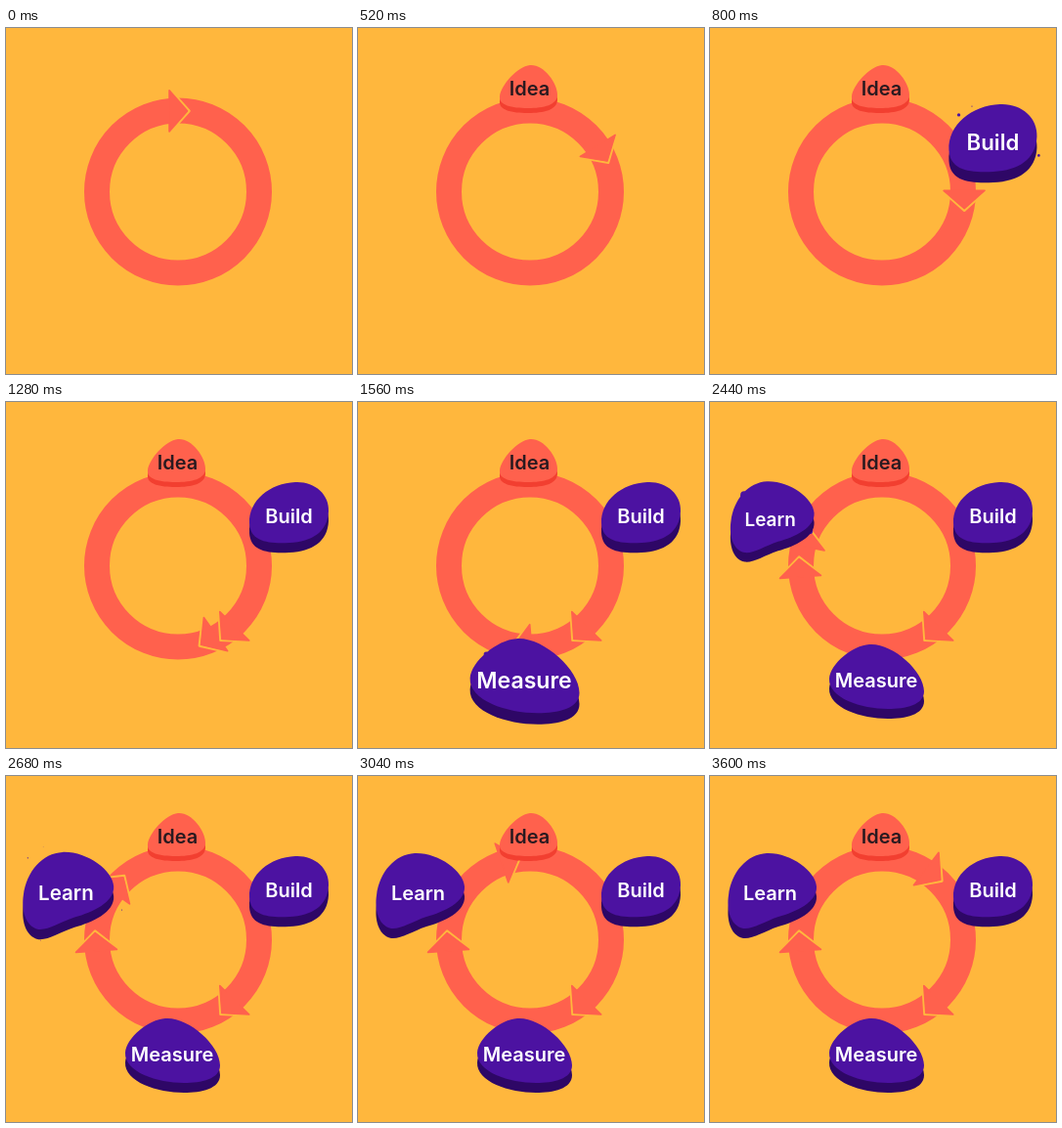
Write an HTML page with a canvas that moves like this. It is 354 by 354 pixels and loops after 4.04 s.

```html
<!DOCTYPE html>
<html lang="en">
<head>
<meta charset="utf-8">
<title>Idea, build, measure, learn</title>
<style>
  html, body { margin: 0; overflow: hidden; background: #ffb73d; }
  canvas { display: block; width: 100vw; height: 100vh; }
</style>
</head>
<body>
<canvas></canvas>
<script>
const SIZE = 354, LOOP = 4040, STEP = 40, LEG = 1200, POP = 400;
const BG = '#ffb73d', RED = '#ff614d';
const CX = 176, CY = 167.5;

const canvas = document.querySelector('canvas');
const ctx = canvas.getContext('2d');
canvas.width = canvas.height = SIZE * devicePixelRatio;
ctx.scale(devicePixelRatio, devicePixelRatio);

const lerp = (a, b, p) => a + (b - a) * p;
const clamp = p => Math.max(0, Math.min(1, p));
const rad = deg => deg * Math.PI / 180;
const backOut = p => 1 + 3.2 * (p - 1) ** 3 + 2.2 * (p - 1) ** 2;

// Each leg: [from, to] for tip angle (clockwise from top), heading and tip radius
const legs = [
  { tip: [8.3, 150.7], heading: [0, 134.5], radius: [83.5, 88] },
  { tip: [157.5, 276.4], heading: [136, 266], radius: [85, 85.5] },
  { tip: [294.3, 406], heading: [277, 397.5], radius: [85.5, 86] },
];

const purple = { face: '#4c12a1', side: '#2e0766', ink: '#fff' };
const stones = [
  { label: 'Idea', start: 0, x: 174, y: 62, rx: 30, ry: 24, depth: 5, textX: 175.5, baseline: 69,
    face: RED, side: '#f23f30', ink: '#2a1a20',
    shape: 'M176 38C190 37 204 56 204 68C204 79 190 82 174 82C157 82 144 79 145 70C146 59 163 39 176 38Z' },
  { label: 'Build', start: 520, x: 290, y: 118, rx: 41, ry: 36, depth: 10, textX: 289.5, baseline: 124, ...purple,
    shape: 'M296 82C315 81 331 94 330 112C329 133 313 143 290 144C268 145 250 143 249 124C248 101 270 83 296 82Z' },
  { label: 'Measure', start: 1350, x: 170, y: 286, rx: 49, ry: 38, depth: 10, textX: 170, baseline: 292, ...purple,
    shape: 'M163 248C186 246 219 275 219 296C219 310 200 314 182 314C155 314 121 303 122 283C123 268 146 249 163 248Z' },
  { label: 'Learn', start: 2328, x: 64, y: 121, rx: 46, ry: 44, depth: 10, textX: 61.5, baseline: 127, ...purple,
    shape: 'M58 79C82 78 108 97 109 113C110 129 88 139 70 144C55 149 44 157 34 156C20 153 17 135 19 122C22 98 38 80 58 79Z' },
];
for (const stone of stones) stone.path = new Path2D(stone.shape);

const splash = [[223, 5.5], [243, 2], [17, 4.5], [120, 3]];  // [angle, size]

function dot(x, y, r) {
  ctx.beginPath();
  ctx.arc(x, y, r, 0, 2 * Math.PI);
  ctx.fill();
}

function drawHead(leg, p) {
  const angle = rad(lerp(...leg.tip, p)), radius = lerp(...leg.radius, p);
  ctx.save();
  ctx.translate(CX + radius * Math.sin(angle), CY - radius * Math.cos(angle));
  ctx.rotate(rad(lerp(...leg.heading, p)));
  ctx.lineJoin = 'round';
  ctx.strokeStyle = BG;
  ctx.lineWidth = 2.4;
  ctx.stroke(new Path2D('M-22 -24L-.5 0L-22 24'));
  ctx.fillStyle = ctx.strokeStyle = RED;
  ctx.lineWidth = 1.6;
  const head = new Path2D('M-21 -21L-2.6 0L-21 21Z');
  ctx.fill(head);
  ctx.stroke(head);
  ctx.restore();
}

function drawStone(stone, time) {
  if (time <= stone.start) return;
  const p = clamp((time - stone.start) / POP);
  const { x, y, rx, ry } = stone;

  ctx.fillStyle = stone.face;
  const reach = 0.5 + 0.75 * (1 - (1 - p) ** 2);
  for (const [deg, size] of splash) {
    dot(x + rx * reach * Math.cos(rad(deg)), y + ry * reach * Math.sin(rad(deg)), size * (1 - p));
  }

  const scale = backOut(p);
  ctx.save();
  ctx.translate(x, y);
  ctx.scale(scale, scale);
  ctx.translate(-x, -y);
  ctx.translate(0, stone.depth);
  ctx.fillStyle = stone.side;
  ctx.fill(stone.path);
  ctx.translate(0, -stone.depth);
  ctx.fillStyle = stone.face;
  ctx.fill(stone.path);

  ctx.font = '600 20px Inter, sans-serif';
  ctx.textAlign = 'center';
  ctx.fillStyle = stone.ink;
  ctx.fillText(stone.label, stone.textX, stone.baseline);
  ctx.restore();
}

function draw(time) {
  ctx.fillStyle = BG;
  ctx.fillRect(0, 0, SIZE, SIZE);

  ctx.strokeStyle = RED;
  ctx.lineWidth = 26;
  ctx.beginPath();
  ctx.arc(CX, CY, 83, 0, 2 * Math.PI);
  ctx.stroke();

  // Parked heads stay on top of the one moving away from them
  const current = Math.min(2, Math.floor(time / LEG));
  for (let i = current; i >= 0; i--) drawHead(legs[i], clamp(time / LEG - i));
  for (const stone of stones) drawStone(stone, time);
}

const begin = performance.now();
function tick() {
  const time = (performance.now() - begin) % LOOP;
  draw(Math.floor(time / STEP) * STEP);
  requestAnimationFrame(tick);
}
tick();
</script>
</body>
</html>
```
